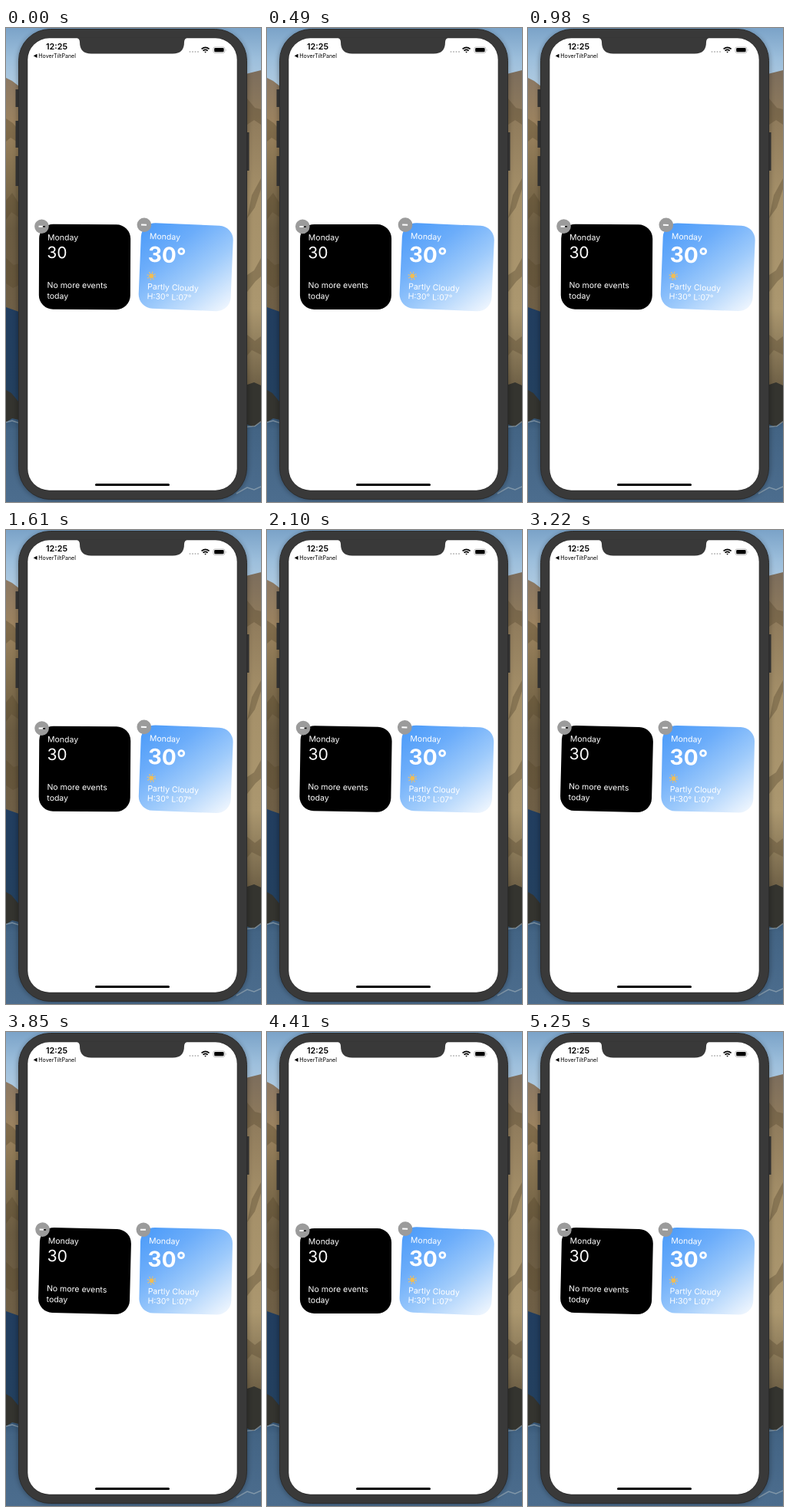
Write an HTML page that moves like this. It is 332 by 618 pixels and loops after 5.32 s.

```html
<!DOCTYPE html>
<html lang="en">
<head>
<meta charset="utf-8">
<title>Jiggling widgets</title>
<style>
  html, body { margin: 0; width: 100%; height: 100%; overflow: hidden; background: #fff; }
  svg { display: block; width: 332px; height: 618px; }
  text { font-family: Inter, "Liberation Sans", sans-serif; }
  .card text { fill: #fff; font-size: 10.5px; }
  .card .day { font-size: 21px; }
  .card .temp { font-size: 28px; font-weight: 700; }
</style>
</head>
<body>
<svg viewBox="0 0 332 618">
  <defs>
    <linearGradient id="sky" x2="0" y2="1">
      <stop offset="0" stop-color="#7ba3c8"/><stop offset=".12" stop-color="#9dbfdc"/>
      <stop offset=".25" stop-color="#b5cee2"/>
    </linearGradient>
    <linearGradient id="cliffL" x2="0" y2="1">
      <stop offset="0" stop-color="#8b7863"/><stop offset=".2" stop-color="#9c835f"/>
      <stop offset=".4" stop-color="#84714f"/><stop offset=".65" stop-color="#6a5b41"/>
      <stop offset="1" stop-color="#6f5f46"/>
    </linearGradient>
    <linearGradient id="cliffR" x2="0" y2="1">
      <stop offset="0" stop-color="#7c6d5c"/><stop offset=".15" stop-color="#8f7b5c"/>
      <stop offset=".4" stop-color="#a59069"/><stop offset=".75" stop-color="#ab976f"/>
      <stop offset="1" stop-color="#6d5f45"/>
    </linearGradient>
    <linearGradient id="sea" x2="0" y2="1">
      <stop offset="0" stop-color="#213d5f"/><stop offset=".5" stop-color="#23405f"/>
      <stop offset=".65" stop-color="#436484"/><stop offset="1" stop-color="#4c6d8e"/>
    </linearGradient>
    <linearGradient id="weather" x1=".06" y1="0" x2=".94" y2="1">
      <stop offset="0" stop-color="#4b9bf9"/><stop offset=".3" stop-color="#6cadfa"/>
      <stop offset=".6" stop-color="#9dcafb"/><stop offset="1" stop-color="#f1f7fe"/>
    </linearGradient>
    <filter id="soft" x="-10%" y="-10%" width="120%" height="120%"><feGaussianBlur stdDeviation="3"/></filter>
    <g id="badge">
      <circle cx="-56.3" cy="-52.5" r="9.3" fill="#9b9b9b"/>
      <path d="M-60.2-52.5h7" stroke="#fff" stroke-width="2"/>
    </g>
  </defs>

  <!-- landscape -->
  <rect width="332" height="340" fill="url(#sky)"/>
  <rect y="350" width="332" height="268" fill="url(#sea)"/>
  <path d="M0 65l8 4 9 7 20 8v286H17L0 364z" fill="url(#cliffL)"/>
  <path d="M0 118l9 6 8 10v16L6 143 0 148zM0 225l8-10 9 14v18L7 240 0 250zM0 300l10 9 7-2v28l-8 4-9-6z" fill="#57492f" opacity=".4"/>
  <path d="M290 74l22-14 20-5v414h-42z" fill="url(#cliffR)"/>
  <path d="M314 92l10 12 8 2v20l-9-6-9 6zM332 196l-12 22-6 30 10-14 8-24zM332 300l-9 16-9 6v22l11-14 7-6zM314 400l10 8 8-6v24l-12-6-6 7z" fill="#5b4c34" opacity=".4"/>
  <path d="M0 472l7 4 10 12v23l-9-2-8 5zM314 465l9-3 9 4v48l-10 6-8-3z" fill="#34342f"/>
  <path d="M0 514l8-2 9 3M314 520l10-1 8-6M300 607l14-8 9 3 9-4" fill="none" stroke="#a3b2bb" stroke-width="1.5" opacity=".6"/>

  <!-- phone -->
  <rect x="15" y="2" width="300" height="614" rx="43" fill="#000" opacity=".3" filter="url(#soft)"/>
  <path d="M12.5 80h5v23h-5zM12.5 121h5v35h-5zM12.5 167h5v39h-5zM312 136h4.5v50H312z" fill="#303030"/>
  <rect x="16.5" y="1.5" width="297" height="613" rx="41" fill="#393939" stroke="#2c2c2c"/>
  <rect x="27.7" y="12.7" width="273.6" height="590.6" rx="28.5" fill="#2b2b2b"/>
  <rect x="28.3" y="13.3" width="272.4" height="589.4" rx="28" fill="#fff"/>
  <path d="M91 12.5q5 1 5 6v0q0 15 15 15h106q15 0 15-15v0q0-5 5-6z" fill="#393939"/>

  <!-- status bar -->
  <text x="52" y="27.5" font-size="10.8" font-weight="600">12:25</text>
  <path d="M40.5 33.7v5.2L35.7 36.3z"/>
  <text x="42.3" y="38.9" font-size="7.1">HoverTiltPanel</text>
  <g fill="#b9b9b9">
    <circle cx="239.5" cy="31" r="1"/><circle cx="243" cy="31" r="1"/>
    <circle cx="246.5" cy="31" r="1"/><circle cx="250" cy="31" r="1"/>
  </g>
  <g fill="none" stroke="#000" stroke-width="1.6">
    <path d="M254.6 27.4q5-4.2 10 0M256.5 29.6q3.1-2.5 6.2 0"/>
    <path d="M258.2 30.8h2.8l-1.4 1.6z" fill="#000" stroke="none"/>
  </g>
  <rect x="269.9" y="24.9" width="15" height="7.6" rx="2.2" fill="none" stroke="#b0b0b0" stroke-width=".8"/>
  <rect x="271.2" y="26.1" width="12.4" height="5.2" rx="1.2"/>
  <path d="M286.1 27.5q1.2 1.2 0 2.4z" fill="#999"/>
  <rect x="116" y="594" width="97" height="3" rx="1.5"/>

  <!-- widgets, drawn around their own centres -->
  <g class="card" id="calendar">
    <rect x="-59.5" y="-55.5" width="119" height="111" rx="18.5"/>
    <text x="-48.7" y="-34.6">Monday</text>
    <text class="day" x="-49.2" y="-11.2">30</text>
    <text x="-48.9" y="27.6">No more events</text>
    <text x="-48.9" y="41.8">today</text>
    <use href="#badge"/>
    <path d="M-54.8-52.3h3" stroke="#111" stroke-width="1.8"/>
  </g>
  <g class="card" id="forecast">
    <rect x="-59.8" y="-55.5" width="120" height="111.5" rx="18.5" fill="url(#weather)"/>
    <text x="-48.7" y="-34.6">Monday</text>
    <text class="temp" x="-49.8" y="-4.6">30°</text>
    <circle cx="-44.2" cy="13.6" r="4.7" fill="none" stroke="#dfbd7c" stroke-width="2.2" stroke-dasharray="1.3 2.39"/>
    <circle cx="-44.2" cy="13.6" r="3" fill="#f0bd55"/>
    <text x="-48.7" y="31">Partly Cloudy</text>
    <text x="-48.7" y="43.7">H:30° L:07°</text>
    <use href="#badge"/>
  </g>
</svg>
<script>
  const LOOP = 5320, STEP = 70, PERIOD = 156.8, START = -0.11;
  const calendar = document.getElementById('calendar');
  const forecast = document.getElementById('forecast');
  const origin = performance.now();

  function place(card, x, angle) {
    card.setAttribute('transform', `translate(${x} 311.5) rotate(${angle.toFixed(3)})`);
  }

  function draw(now) {
    const t = Math.max(0, now - origin) % LOOP;
    const held = Math.floor(t / STEP) * STEP;
    const swing = (1 - Math.cos(2 * Math.PI * (held / PERIOD + START))) / 2;
    place(calendar, 102.5, 0.1 + 1.4 * swing);
    place(forecast, 234, 2.5 - 1.3 * swing);
    requestAnimationFrame(draw);
  }
  draw(origin);
</script>
</body>
</html>
```
